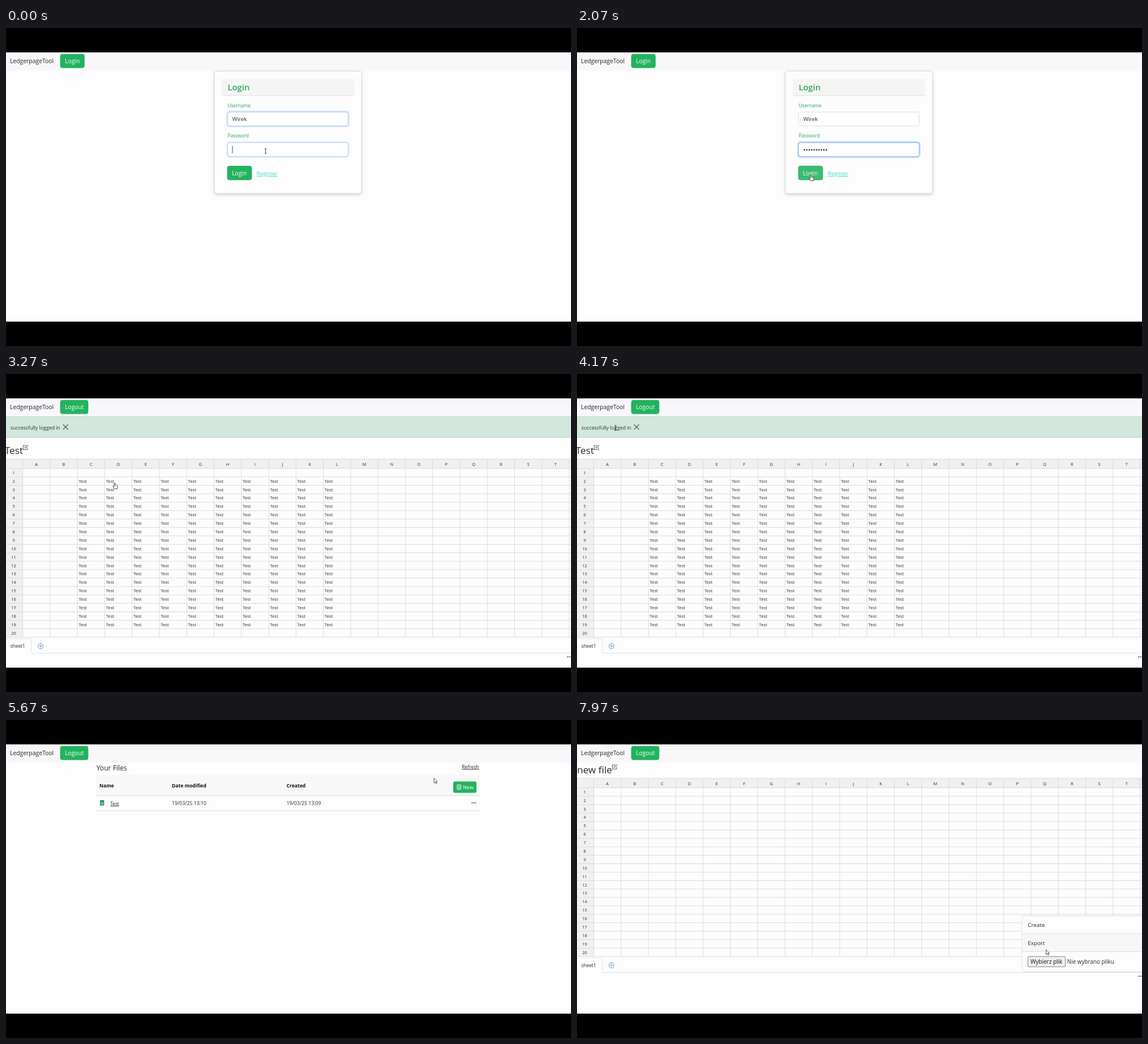
An HTML page for the animation above (8 s loop, 998 by 561 pixels).

```html
<!DOCTYPE html>
<html lang="en">
<head>
<meta charset="utf-8">
<title>Spreadsheet demo</title>
<style>
  html, body { margin: 0; width: 100%; height: 100%; overflow: hidden; background: #000; }
  svg { display: block; width: 100%; height: 100%; font-family: "Open Sans", "Noto Sans", sans-serif; }
  text { white-space: pre; }
</style>
</head>
<body>
<svg id="stage" viewBox="0 0 998 561"></svg>
<script>
const LOOP = 8000, ALERT_HEIGHT = 47;
const GREEN = '#22b35e', GREEN_HOVER = '#3cbb70', INK = '#25282b', LINE = '#dcdde2';

const rect = (x, y, w, h, fill, extra = '') =>
  `<rect x="${x}" y="${y}" width="${w}" height="${h}" fill="${fill}" ${extra}/>`;
const text = (x, y, size, str, fill = INK, extra = '') =>
  `<text x="${x}" y="${y}" font-size="${size}" fill="${fill}" ${extra}>${str}</text>`;
const path = (d, stroke, width = 1, extra = '') =>
  `<path d="${d}" fill="none" stroke="${stroke}" stroke-width="${width}" ${extra}/>`;
const group = (id, content) => `<g id="${id}">${content}</g>`;
const repeat = (n, fn) => Array.from({ length: n }, (_, i) => fn(i)).join('');
const dots = (x, y) => repeat(3, i => `<circle cx="${x + i * 3}" cy="${y}" r=".95" fill="#333"/>`);
const button = (x, y, w, h, label, id = '') =>
  rect(x, y, w, h, GREEN, `rx="3.5" stroke="#1fa656" stroke-width=".7" id="${id}"`) +
  text(x + 8.3, y + h / 2 + 4.2, 10.2, label, '#fff');
const underline = 'text-decoration="underline"';

function field(y, id) {
  return rect(391.4, y, 213, 24.6, '#fff', `rx="4" stroke="${LINE}"`) +
    group(id, rect(390.2, y - 1.2, 215.4, 27, 'none', 'rx="5" stroke="#c2dafe" stroke-width="2.4"') +
      rect(391.4, y, 213, 24.6, 'none', 'rx="4" stroke="#86b7fe"'));
}

function loginScreen() {
  return rect(368, 76, 260, 216, '#fdfdfd',
      'rx="4.5" stroke="#d6d7d8" style="filter:drop-shadow(0 2px 2.5px rgba(0,0,0,.16))"') +
    rect(381, 90, 234, 29, '#f5f6f4') + path('M381 119H615', LINE) +
    text(391.5, 110, 14.8, 'Login', '#2aa65b', 'font-weight="600"') +
    text(391.5, 139.5, 8.4, 'Username', '#2f9d62') + field(148.2, 'userFocus') +
    text(399.7, 164.4, 9.7, 'Wirek') +
    text(391.5, 193, 8.3, 'Password', '#2f9d62') + field(202.2, 'passFocus') +
    group('bullets', repeat(10, i => `<circle cx="${401.7 + i * 4.3}" cy="215" r="1.35" fill="${INK}"/>`)) +
    `<path id="caret" d="M0 208V221" stroke="#333" stroke-width=".9"/>` +
    button(391, 243.5, 43, 24.5, 'Login', 'loginButton') +
    text(442.6, 260.2, 9.8, 'Register', '#35dfc2', underline);
}

function filesScreen() {
  const bold = 'font-weight="700"';
  const heads = [[165, 'Name'], [293, 'Date modified'], [495.5, 'Created']];
  return text(159.7, 88.5, 12.1, 'Your Files', INK, 'font-weight="500"') +
    text(805, 85.7, 8.7, 'Refresh', INK, underline) +
    rect(160, 97, 676.5, 36.5, '#f7f8fa') + path('M160 133.5H836.5M160 160H836.5', LINE) +
    heads.map(([x, label]) => text(x, 118.6, 8.6, label, '#111', bold)).join('') +
    rect(790, 108.5, 41, 20, GREEN, 'rx="3" id="newButton"') +
    rect(796.9, 114, 6.6, 8.8, 'none', 'rx="1" stroke="#fff" stroke-width=".9"') +
    path('M798 116.2H802.4M798.3 118.8H802.2M798.3 120.8H802.2', '#fff', 1.1) +
    text(807, 122.2, 9.1, 'New', '#fff') +
    rect(160, 133.5, 676.5, 26.5, '#eaeaea', 'id="fileRow"') +
    rect(166, 141.5, 7.4, 9.8, '#198754', 'rx="1"') +
    path('M166.6 145H172.8M166.6 147.3H172.8M166.6 149.4H172.8M168.6 145V150.8M170.8 145V150.8', '#b9dcc8', .7) +
    text(184, 150.6, 8.3, 'Test', INK, underline) +
    text(293, 150.3, 8.75, '19/03/25 13:10') + text(495.5, 150.3, 8.75, '19/03/25 13:09') +
    dots(823.4, 146.3);
}

const editIcon = x =>
  path(`M${x + 5} 79H${x + .5}V86.5H${x + 8}V82.5M${x + 3} 84L${x + 3.5} 82.3L${x + 7.6} 78.2L${x + 8.8} 79.4L${x + 4.7} 83.5Z`, '#333', .8);

function sheetScreen() {
  const left = 29.6, top = 119.6, colW = 48.27, rowH = 14.88, bottom = top + 20 * rowH;
  const middle = 'text-anchor="middle"';
  const title = (id, x, label) =>
    group(id, text(x, 93.6, 17.2, label, INK, 'text-anchor="end" font-weight="500"') + editIcon(x));
  return title('testTitle', 30, 'Test') + title('newTitle', 62, 'new file') +
    rect(0, 103, 998, top - 103, '#f0f0f0') + rect(0, top, left, bottom - top, '#f0f0f0') +
    path('M0 103H998' + repeat(21, i => `M0 ${top + i * rowH}H998`) +
      repeat(21, i => `M${left + i * colW} 103V${bottom}`), '#d8d8db', .9) +
    repeat(20, i => text(left + (i + .5) * colW, 114.8, 7.5, String.fromCharCode(65 + i), INK, middle) +
      text(13.5, top + (i + .5) * rowH + 2.8, 7.4, i + 1, INK, middle)) +
    group('cells', repeat(18, r => repeat(10, c =>
      text(128.4 + c * colW, top + (r + 1.5) * rowH + 2.8, 7.7, 'Test')))) +
    path('M0 420H45V445.5H998', '#e2e3e6') + text(7.7, 436.2, 8.3, 'sheet1') +
    '<circle cx="61" cy="433" r="4.6" fill="none" stroke="#5c83bd" stroke-width=".9"/>' +
    path('M58.6 433H63.4M61 430.6V435.4', '#5c83bd', .9) + dots(992, 452);
}

function menuPanel() {
  return rect(786, 345.5, 220, 99, '#fdfdfd', `rx="4" stroke="${LINE}"`) +
    rect(786.5, 377, 212, 32, '#f7f7f9', 'id="exportRow"') +
    path('M786 377H998M786 408.5H998', LINE) +
    text(796.3, 365.2, 9.8, 'Create') + text(796.3, 397, 9.8, 'Export') +
    rect(796.5, 417.3, 66, 18, '#efefef', 'rx="1.5" stroke="#777" stroke-width=".9"') +
    text(801, 430.2, 10, 'Wybierz plik', '#111') + text(865.8, 430.2, 9.9, 'Nie wybrano pliku');
}

const cursors =
  group('arrow', '<path d="M0 0V8.6L2 6.8L3.4 9.8L4.8 9.2L3.5 6.3H6Z" fill="#fff" stroke="#222" stroke-width=".75"/>') +
  group('beam', path('M-1.8-4.2H-.4L0-3.8L.4-4.2H1.8M0-3.8V3.8M-1.8 4.2H-.4L0 3.8L.4 4.2H1.8', '#222', .9)) +
  group('hand', '<path d="M-.9 .8Q0-.6 .9 .8V3.8L4.6 4.8Q5.4 5 5.2 6.2L4.5 10.5H-.2L-3.2 6.6Q-3.2 5.2-2 5.7L-.9 6.6Z" fill="#fff" stroke="#222" stroke-width=".8"/>');

const stage = document.getElementById('stage');
stage.innerHTML = rect(0, 43, 998, 475, '#fdfdfd') + rect(0, 43, 998, 32, '#f8f8fb') +
  text(7, 61.6, 10.4, 'LedgerpageTool', INK, 'font-weight="500"') +
  group('loginNav', button(96, 46.2, 42.4, 24, 'Login')) +
  group('logoutNav', button(96, 46.2, 49, 24, 'Logout')) +
  group('alert', rect(0, 75.5, 998, 36.5, '#d3e8dd') + path('M0 75.5H998M0 112H998', '#b2d5c3') +
    text(7.7, 98, 8.8, 'successfully logged in', '#17402c') + path('M100.7 89L109.7 98M109.7 89L100.7 98', '#4c5a53', 1.1)) +
  group('login', loginScreen()) + group('files', filesScreen()) +
  group('sheet', sheetScreen()) + group('menu', menuPanel()) +
  group('cursor', cursors) + rect(0, 0, 998, 43, '#000') + rect(0, 518, 998, 43, '#000');

const el = {};
stage.querySelectorAll('[id]').forEach(node => { if (node.id) el[node.id] = node; });
const show = (id, on) => { el[id].style.display = on ? '' : 'none'; };
const clamp = v => Math.min(1, Math.max(0, v));
const ease = k => k * k * (3 - 2 * k);

// Moments (ms) at which the page changes.
const AT = { files: 2300, sheet: 3220, dismiss: 4500, back: 5150, created: 6080, menu: 6980 };

// Pointer stops: time, x, y, shape on arrival.
const stops = [
  [0, 458.5, 217, 'beam'], [1350, 458.5, 217, 'beam'], [1650, 413, 259, 'hand'],
  [2300, 413, 259, 'hand'], [2830, 220.5, 188.5, 'arrow'], [3020, 192, 192, 'hand'],
  [3300, 192, 192, 'arrow'], [4170, 68, 95, 'beam'], [4400, 105, 93, 'hand'],
  [4600, 105, 93, 'arrow'], [4950, 46, 57, 'hand'], [5170, 46, 57, 'hand'],
  [5670, 756, 102.5, 'arrow'], [5930, 810, 117, 'hand'], [6130, 810, 117, 'arrow'],
  [6750, 994, 448, 'hand'], [7080, 994, 448, 'hand'], [7940, 828.5, 405, 'arrow'],
  [LOOP, 828.5, 405, 'arrow']
];

function pointerAt(t) {
  const i = Math.max(1, stops.findIndex(s => s[0] > t));
  const [t0, x0, y0, from] = stops[i - 1], [t1, x1, y1, to] = stops[i];
  const k = ease((t - t0) / (t1 - t0));
  const resting = x0 === x1 && y0 === y1;
  const shape = resting || k < .06 ? from : k > .88 ? to : 'arrow';
  return { x: x0 + (x1 - x0) * k, y: y0 + (y1 - y0) * k, shape };
}

function draw(t) {
  const p = pointerAt(t);
  const over = (x, y, w, h) => p.x >= x && p.x < x + w && p.y >= y && p.y < y + h;
  const within = (a, b) => t >= a && t < b;

  const alertOn = within(AT.files, AT.dismiss);
  const shift = alertOn ? ALERT_HEIGHT : 0;
  const testSheet = within(AT.sheet, AT.back), newSheet = t >= AT.created;
  const loggedIn = t >= AT.files;
  show('login', !loggedIn);
  show('loginNav', !loggedIn);
  show('logoutNav', loggedIn);
  show('alert', alertOn);
  show('files', loggedIn && !testSheet && !newSheet);
  show('sheet', testSheet || newSheet);
  show('testTitle', testSheet);
  show('cells', testSheet);
  show('newTitle', newSheet);
  show('menu', t >= AT.menu);
  for (const id of ['files', 'sheet']) el[id].setAttribute('transform', `translate(0 ${shift})`);

  const focus = clamp((t + 60) / 150);
  el.userFocus.setAttribute('opacity', 1 - focus);
  el.passFocus.setAttribute('opacity', focus);
  const typed = Math.floor(clamp((t - 250) / 1050) * 10);
  [...el.bullets.children].forEach((dot, i) => { dot.style.display = i < typed ? '' : 'none'; });
  show('caret', Math.floor(t / 530) % 2 === 0);
  el.caret.setAttribute('transform', `translate(${400 + typed * 4.3} 0)`);

  el.loginButton.setAttribute('fill', over(391, 243, 43, 25) ? GREEN_HOVER : GREEN);
  el.newButton.setAttribute('fill', over(790, 108 + shift, 41, 20) ? GREEN_HOVER : GREEN);
  show('fileRow', over(160, 133.5 + shift, 676, 26.5));
  show('exportRow', over(786, 377, 212, 32));

  for (const id of ['arrow', 'beam', 'hand']) show(id, id === p.shape);
  el.cursor.setAttribute('transform', `translate(${p.x} ${p.y})`);
}

const start = performance.now();
function tick() {
  draw((performance.now() - start) % LOOP);
  requestAnimationFrame(tick);
}
tick();
</script>
</body>
</html>
```
